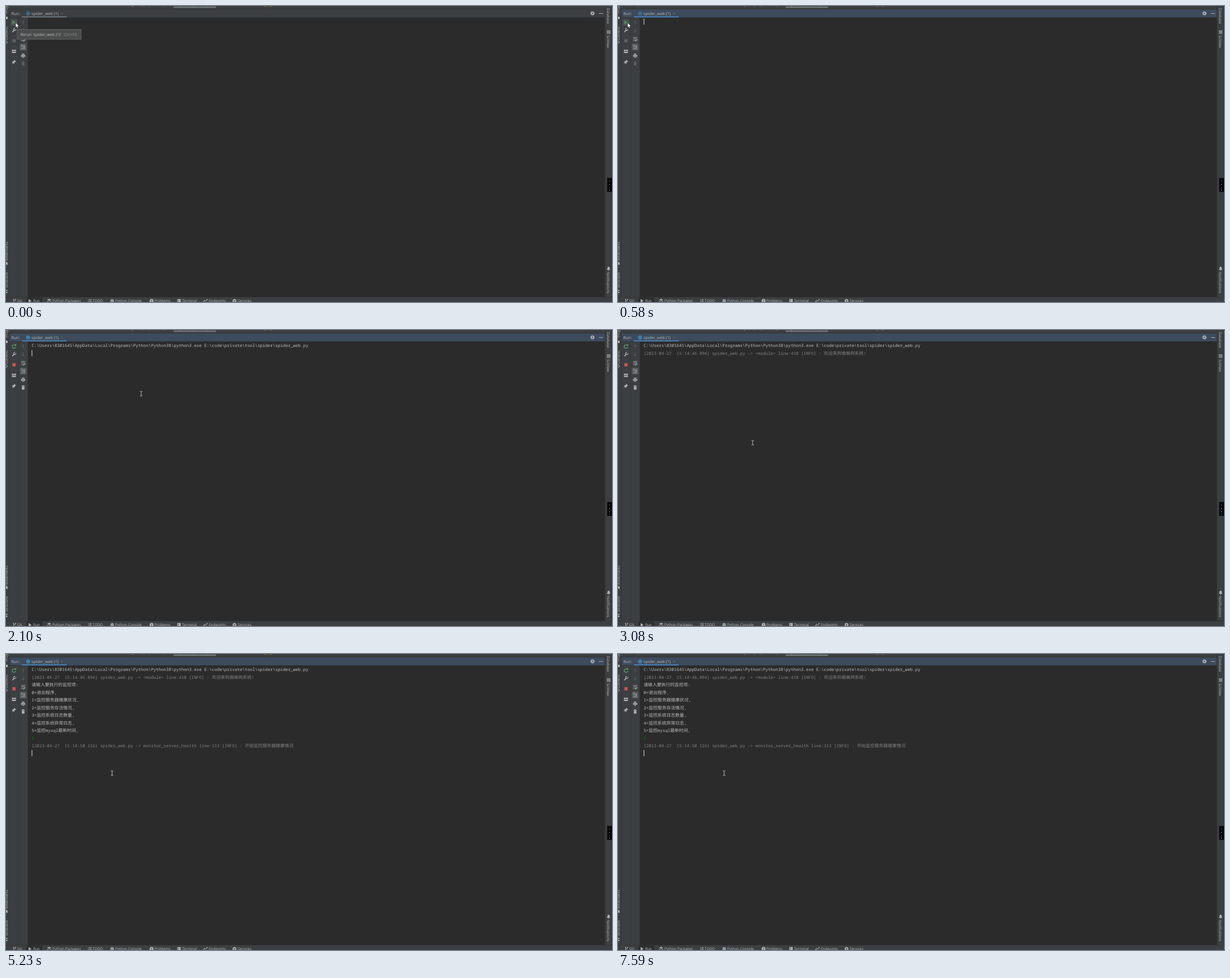
An HTML page that plays this animation: 1070x524 px, repeating every 8000 ms.

```html
<!DOCTYPE html>
<html lang="en">
<head>
<meta charset="utf-8">
<title>Run console</title>
<style>
  html, body { margin: 0; width: 100%; height: 100%; overflow: hidden; background: #2b2b2b; }
  svg { display: block; width: 100vw; height: 100vh; }
  text { white-space: pre; text-rendering: geometricPrecision; }
  .ui { font-family: "Open Sans", "Noto Sans", sans-serif; fill: #bbbbbb; }
  .mono { font: 7.477px "Noto Sans Mono", "DejaVu Sans Mono", monospace; }
  .cjk { font: 7.8px "Noto Sans CJK SC", "Noto Sans CJK", sans-serif; }
</style>
</head>
<body>
<svg id="stage" viewBox="0 0 1070 524" xmlns="http://www.w3.org/2000/svg"></svg>
<script>
const NS = 'http://www.w3.org/2000/svg';
const LOOP = 8000;
const stage = document.getElementById('stage');
const ICON = '#afb1b3', DIM = '#5c5f61', PANEL = '#3c3f41', EDGE = '#323334';

function add(tag, attrs, parent = stage) {
  const el = document.createElementNS(NS, tag);
  for (const k in attrs) el.setAttribute(k, attrs[k]);
  parent.appendChild(el);
  return el;
}
const group = (parent = stage) => add('g', {}, parent);
const rect = (x, y, width, height, fill, parent, extra) =>
  add('rect', { x, y, width, height, fill, ...extra }, parent);
const fillPath = (d, fill, parent) => add('path', { d, fill }, parent);
const line = (d, stroke = ICON, parent, width = 1) =>
  add('path', { d, stroke, 'stroke-width': width, fill: 'none' }, parent);
const dot = (cx, cy, r, fill, parent) => add('circle', { cx, cy, r, fill }, parent);

function label(x, y, str, size = 6.4, parent, extra) {
  const el = add('text', { x, y, class: 'ui', 'font-size': size, ...extra }, parent);
  el.textContent = str;
  return el;
}
const turned = (x, y, angle, str) =>
  label(0, 0, str, 6.4, stage, { transform: `translate(${x} ${y}) rotate(${angle})` });
const show = (el, on) => el.setAttribute('visibility', on ? 'visible' : 'hidden');

// ---- Window chrome ----
rect(0, 0, 1070, 524, PANEL);
rect(296, 0, 75, 2, '#4e5254');
rect(296, 1.7, 75, 1.6, '#7a8085');
for (const x of [222, 305, 456, 466]) rect(x, 0, 2.5, 0.8, '#a08c2e');
for (const x of [34, 240, 252, 279, 318, 330, 355]) rect(x, 0, 2, 0.7, '#74777a');
rect(0, 5, 1058, 1, EDGE);
const header = rect(6, 6, 1052, 14, PANEL);
rect(6, 20, 1052, 0.7, EDGE);
rect(38.5, 20.5, 1019, 494.5, '#2b2b2b');
rect(5.7, 6, 0.8, 509, EDGE);
rect(21.8, 20.5, 0.8, 494.5, EDGE);
rect(1057.3, 0, 0.8, 515, EDGE);
rect(1069, 0, 1, 515, '#2f3133');
rect(0, 515, 1070, 0.8, EDGE);

label(9.5, 15.6, 'Run:', 7);
const tabLine = rect(28, 18.4, 79, 1.8, '#747a80');
const tabDot = dot(39, 13.2, 3.7, '#3c7ea8');
label(45, 15.6, 'spider_web (1)', 7.1);
line('M97.6 11.8l3 3m0-3l-3 3', '#6e7173', stage, 0.7);

// Gear and minimise
add('circle', { cx: 1035.5, cy: 13, r: 2, fill: 'none', stroke: ICON, 'stroke-width': 1.7 });
add('circle', { cx: 1035.5, cy: 13, r: 3.2, fill: 'none', stroke: ICON, 'stroke-width': 1.2, 'stroke-dasharray': '1.5 1.01' });
line('M1047 13.3h7');

// ---- Side stripes ----
turned(3, 13, -90, 'Project');
turned(3, 60, -90, 'Commit');
turned(3, 451, -90, 'Bookmarks');
turned(3, 499, -90, 'Structure');
rect(0, 19, 3, 4, ICON);
line('M0 61.5l3 2.5l-3 2.5');
fillPath('M0 453.5h2.8v5.5l-1.6-1.6l-1.2 1z', ICON);
rect(0, 502.5, 2.5, 2, ICON);
rect(0, 506, 2.5, 2, ICON);

turned(1060.8, 3.5, 90, 'Database');
turned(1060.8, 52, 90, 'SciView');
turned(1060.8, 471, 90, 'Notifications');
for (let i = 0; i < 9; i++)
  rect(1061 + (i % 3) * 2.2, 43.2 + Math.floor(i / 3) * 2.2, 1.7, 1.5, ICON);
fillPath('M1061 467v-0.8l1-1.2v-1.6q0-2 2-2t2 2v1.6l1 1.2v0.8zM1063.2 467.7h1.6v1h-1.6z', ICON);

rect(1061.5, 304.5, 8.5, 24.5, '#050505');
for (const y of [309, 315, 321, 325]) rect(1065, y, 1, y % 2 ? 1.6 : 1, '#8b8b8b');

// ---- Bottom bar ----
rect(36, 515.8, 28, 9, '#2d2f30');
const tools = [
  [20, 'Git'], [48, 'Run'], [82, 'Python Packages'], [153, 'TODO'], [193, 'Python Console'],
  [262, 'Problems'], [311, 'Terminal'], [358, 'Endpoints'], [409, 'Services']
];
for (const [x, name] of tools) label(x, 524.3, name);
line('M13.5 519v6M16.8 519.5v1.5l-3.3 2', ICON, stage, 0.9);
dot(13.5, 519.6, 1, ICON);
dot(16.8, 519.6, 1, ICON);
fillPath('M40 518.8l5 3.2l-5 3.2z', ICON);
fillPath('M72.5 520.3l3.7-1.8l3.7 1.8l-3.7 1.8zM72.5 522.5l3.7 1.5l3.7-1.5v1.2l-3.7 1.6l-3.7-1.6z', ICON);
line('M145 519.8h1.2m1 0h4M145 522h1.2m1 0h4M145 524h1.2m1 0h4', ICON);
dot(187.5, 522, 3.2, '#8d989f');
dot(257, 522, 3.4, ICON);
rect(256.5, 520, 1, 2.5, PANEL);
rect(256.5, 523.1, 1, 0.9, PANEL);
rect(302.5, 518.8, 6, 6, ICON);
line('M303.6 520.2l1.7 1.5l-1.7 1.5', PANEL, stage, 0.8);
line('M349 523.5l2-3l2 2.5l2-3.5', ICON, stage, 0.9);
dot(349.5, 523, 1, ICON);
dot(355, 519.8, 1, ICON);
dot(403.5, 522, 3.3, ICON);
fillPath('M402.6 520.2l2.8 1.8l-2.8 1.8z', PANEL);

// ---- Toolbars ----
for (const y of [52, 70.8, 89.5]) rect(8.5, y, 11, 0.6, '#4b4e50');
const hover = rect(8.5, 23.5, 11.5, 11.5, '#4c5052', stage, { rx: 1.5 });
const play = fillPath('M11.2 25.4l6 3.6l-6 3.6z', '#4a8f4e');
const rerun = group();
line('M16.3 27.2a3.1 3.1 0 1 0 0.8 2.6', '#59a869', rerun, 1.2);
fillPath('M14.6 27.8h3.2v-3.2z', '#59a869', rerun);
line('M11 46.4l4-4', ICON, stage, 1.6);
line('M17.4 41a2 2 0 1 1-1.6-1.5', ICON, stage, 1.2);
const stop = rect(11.2, 58.7, 5.8, 5.8, DIM);
rect(10.5, 77.2, 3, 2.8, ICON);
rect(14.3, 77.2, 3.2, 2.8, ICON);
rect(10.5, 80.8, 7, 2.4, ICON);
fillPath('M14.3 95l3.6 3.6l-1 0.5l-0.7-0.1l-1.2 1.3l0 1.5l-0.8 0.7l-3.6-3.6l0.7-0.8l1.5 0l1.3-1.2z', ICON);
line('M12.6 100.2l-2.3 2.4', ICON, stage, 0.9);

line('M30.3 32.4v-6.3M27.9 28.6l2.4-2.5l2.4 2.5', DIM);
line('M30.3 39.8v6.3M27.9 43.7l2.4 2.5l2.4-2.5', DIM);
line('M26.8 55.7h7M26.8 58.3h5.3a1.6 1.6 0 0 1 0 3.2h-1.6M26.8 61.4h1.6', ICON, stage, 1.1);
fillPath('M31.2 59.7v3.6l-2.2-1.8z', ICON);
rect(24.3, 66.8, 12, 11.8, '#55595c', stage, { rx: 1.5 });
line('M26.8 75.8h7M26.8 69.4h3M26.8 72h3M32 69v4.4M30.3 72l1.7 1.8l1.7-1.8', ICON, stage, 1);
rect(28.2, 84.4, 4.2, 1.8, ICON);
fillPath('M26.7 86.8h7.2v3.4h-1.5v-1.4h-4.2v1.4h-1.5z', ICON);
rect(28.9, 89.4, 2.8, 2, ICON);
const trash = fillPath('M27.5 98.8h1.7v-0.9h2.2v0.9h1.7v1.1h-5.6zM28 100.6h4.6v4.8h-4.6z', DIM);

// ---- Console output ----
const LOG = '#808080', OUT = '#bbbbbb';
const rowY = n => 13.45 * n;

// Splits a line into Latin and Chinese runs, each in its own face.
function printed(row, from, fill, str) {
  const el = add('text', { x: 45.3, y: 30.4 + rowY(row), class: 'mono', fill });
  for (const run of str.match(/[\u4e00-\u9fff]+|[^\u4e00-\u9fff]+/g)) {
    const part = add('tspan', { class: run >= '\u4e00' ? 'cjk' : 'mono' }, el);
    part.textContent = run;
  }
  return { el, from };
}
const menu = [
  '请输入要执行的监控项:', '0=退出程序,', '1=监控服务器健康状况,', '2=监控服务存活情况,',
  '3=监控系统日志数量,', '4=监控系统异常日志,', '5=监控mysql最新时间,'
];
const output = [
  printed(0, 700, OUT, String.raw`C:\Users\8301645\AppData\Local\Programs\Python\Python38\python3.exe E:\code\private\tool\spider\spider_web.py`),
  printed(1, 2250, LOG, '[2023-04-27  15:14:46.894] spider_web.py -> <module> line:410 [INFO] : 欢迎来到蜘蛛网系统!'),
  ...menu.map((str, i) => printed(2 + i, 3200, OUT, str)),
  printed(9, 4580, '#007f00', '1'),
  printed(10, 5230, LOG, '[2023-04-27  15:14:50.116] spider_web.py -> monitor_server_health line:313 [INFO] : 开始监控服务器健康情况')
];
output[9].el.setAttribute('font-style', 'italic');
const caret = rect(45.3, 22, 1.1, 11, '#d0d0d0');

// ---- Tooltip and pointers ----
const tip = group();
rect(19.8, 41.5, 113, 17.5, '#4b4d4d', tip, { stroke: '#66696b', 'stroke-width': 0.8 });
label(25.7, 52.6, "Rerun 'spider_web (1)'", 7, tip);
label(102.3, 52.6, 'Ctrl+F5', 6.9, tip).style.fill = '#929292';

const arrow = add('path', {
  d: 'M17 29.6v8.6l2-1.8l1.3 3l1.4-0.6l-1.3-2.9h2.7z',
  fill: '#ffffff', stroke: '#111111', 'stroke-width': 0.5
});
const beam = line('M-2.2 -4h1.6l0.6 0.6l0.6 -0.6h1.6M0 -3.5v7M-2.2 4h1.6l0.6 -0.6l0.6 0.6h1.6', '#c8c8c8', stage, 0.9);

// ---- Timeline ----
// Each caret entry: time, row (-1 hides it), column.
const caretSteps = [
  [0, -1], [580, 0], [700, 1], [1700, -1], [2100, 1], [2250, 2], [3080, -1], [3200, 9],
  [4050, -1], [4580, 9, 1], [5110, 10], [5230, 11], [6060, -1], [6620, 11], [7030, -1], [7590, 11]
];
// Each pointer entry: time, x, y.
const beamSteps = [
  [1010, 70, 52], [1130, 152, 86], [1250, 191.4, 99], [1400, 192.2, 99],
  [1700, 222, 108], [1820, 238.7, 112.7], [2250, 238.3, 113.6], [2650, 235.7, 166.5],
  [2800, 237.8, 199.6], [3200, 239.5, 199], [3350, 247.4, 186], [3500, 215, 201],
  [3620, 188.3, 210.6], [3770, 187.3, 210.8]
];
const current = (steps, t) => steps.filter(s => s[0] <= t).pop();

function draw(t) {
  const focused = t >= 580, running = t >= 700;
  header.setAttribute('fill', focused ? '#3d4b5c' : PANEL);
  tabLine.setAttribute('fill', focused ? '#4a88c7' : '#747a80');
  tabDot.setAttribute('opacity', running ? 1 : 0.65);
  stop.setAttribute('fill', running ? '#c75450' : DIM);
  trash.setAttribute('fill', running ? ICON : DIM);
  show(hover, !running);
  show(play, !running);
  show(rerun, running);
  show(tip, t < 430);

  for (const { el, from } of output) show(el, t >= from);

  const [, row, col = 0] = current(caretSteps, t);
  show(caret, row >= 0);
  caret.setAttribute('x', 45.3 + col * 4.486);
  caret.setAttribute('y', 22 + rowY(Math.max(row, 0)));

  const at = current(beamSteps, t);
  show(arrow, !at);
  show(beam, !!at);
  if (at) beam.setAttribute('transform', `translate(${at[1]} ${at[2]})`);
}

function tick() {
  draw(performance.now() % LOOP);
  requestAnimationFrame(tick);
}
draw(0);
requestAnimationFrame(tick);
</script>
</body>
</html>
```
